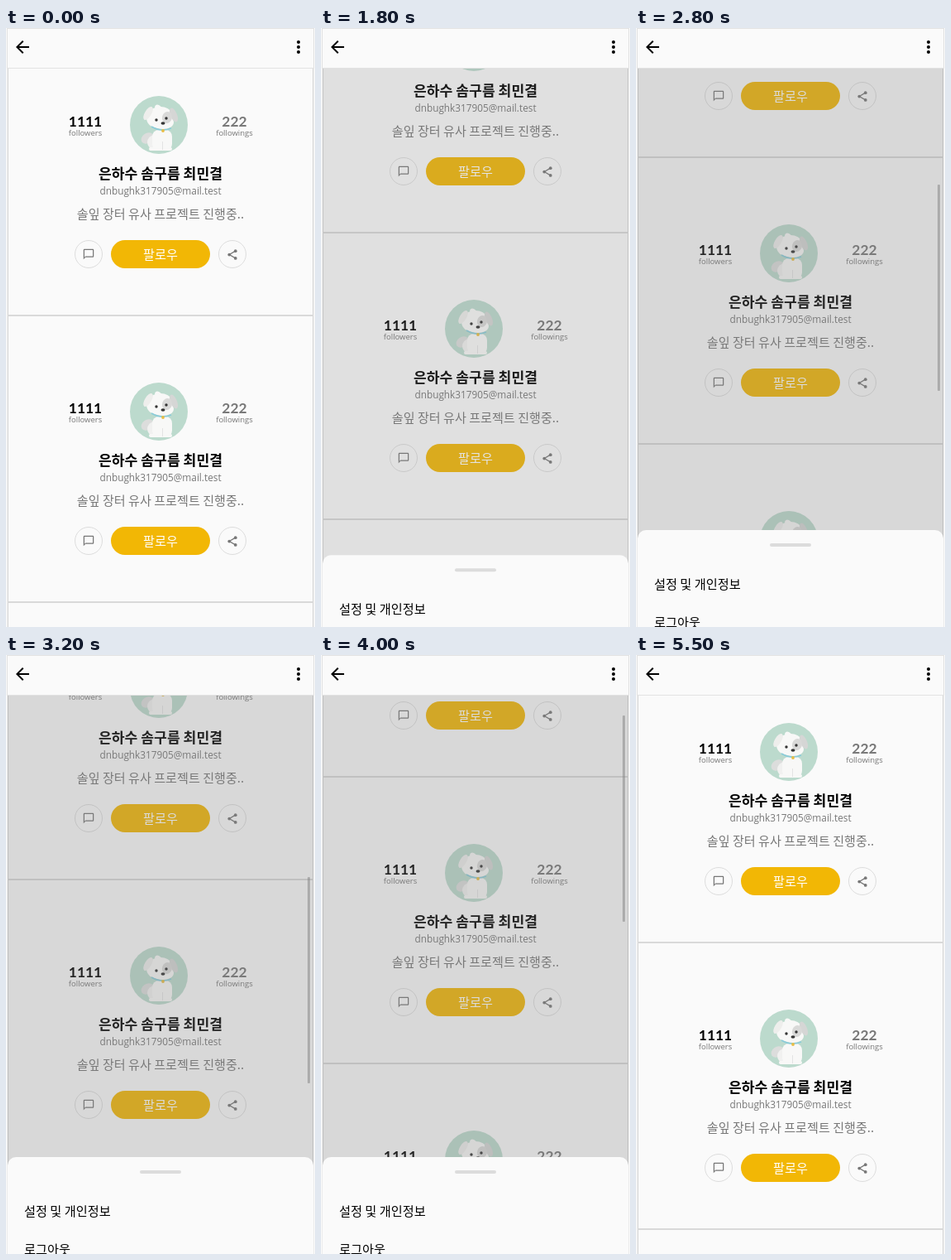
Write an HTML page with a canvas that moves like this. It is 374 px wide and 723 px high and loops after 5600 ms.

```html
<!DOCTYPE html>
<html lang="ko">
<head>
<meta charset="utf-8">
<title>프로필</title>
<style>
html, body { margin: 0; width: 100%; height: 100%; overflow: hidden; background: #fafafa; }
canvas { display: block; width: 374px; height: 723px; }
</style>
</head>
<body>
<canvas id="stage" width="374" height="723"></canvas>
<script>
const ctx = document.getElementById('stage').getContext('2d');
const LOOP = 5600, STEP = 100, BAR_HOLD = 400;
const CARD_H = 346, SHEET_H = 117;
const LATIN = '"Open Sans", sans-serif';
const DIGITS = '700 17.4px Lato, sans-serif';
const KOREAN = '"Noto Sans CJK KR", "Noto Sans CJK", sans-serif';
const GREY = '#777';

const ICONS = {
  back: new Path2D('M20 11H7.83l5.59-5.59L12 4l-8 8 8 8 1.41-1.41L7.83 13H20z'),
  chat: new Path2D('M20 2H4c-1.1 0-2 .9-2 2v18l4-4h14c1.1 0 2-.9 2-2V4c0-1.1-.9-2-2-2zm0 14H6l-2 2V4h16z')
};

// Each drag eases to its offset; power < 1 slows down, > 1 speeds up.
const DRAGS = [
  { start: 1100, end: 1300, to: 100, power: .6 },
  { start: 2300, end: 2900, to: 707, power: 1.8 },
  { start: 3100, end: 3300, to: 800, power: .6 },
  { start: 3300, end: 3700, to: 478, power: 1 },
  { start: 3800, end: 4000, to: 200, power: .6 },
  { start: 4700, end: 5000, to: 0, power: .6 }
];

const progress = (t, start, end) => Math.min(1, Math.max(0, (t - start) / (end - start)));
const smooth = p => p * p * (3 - 2 * p);

function scrollAt(t) {
  return DRAGS.reduce((y, d) => y + (d.to - y) * progress(t, d.start, d.end) ** d.power, 0);
}

function barAt(t) {
  const last = DRAGS.findLast(d => d.start < t);
  if (!last) return 0;
  return 1 - progress(t, last.end + BAR_HOLD - STEP, last.end + BAR_HOLD + STEP);
}

function sheetAt(t) {
  return smooth(progress(t, 1600, 1900)) - smooth(progress(t, 4300, 4500));
}

function text(str, x, y, font, color, align = 'center') {
  ctx.font = font;
  ctx.fillStyle = color;
  ctx.textAlign = align;
  ctx.fillText(str, x, y);
}

function rect(x, y, w, h, color) {
  ctx.fillStyle = color;
  ctx.fillRect(x, y, w, h);
}

function rounded(x, y, w, h, r, color) {
  ctx.fillStyle = color;
  ctx.beginPath();
  ctx.roundRect(x, y, w, h, r);
  ctx.fill();
}

function frame(x, y, w, h, color) {
  ctx.strokeStyle = color;
  ctx.lineWidth = 1;
  ctx.strokeRect(x + .5, y + .5, w - 1, h - 1);
}

function oval(x, y, rx, ry, color, turn = 0) {
  ctx.fillStyle = color;
  ctx.beginPath();
  ctx.ellipse(x, y, rx, ry, turn, 0, Math.PI * 2);
  ctx.fill();
}

function dot(x, y, r, color) { oval(x, y, r, r, color); }

function icon(path, x, y, size, color) {
  ctx.save();
  ctx.translate(x, y);
  ctx.scale(size / 24, size / 24);
  ctx.fillStyle = color;
  ctx.fill(path);
  ctx.restore();
}

function puppy(x, y) {
  const white = '#f8f8f7', dark = '#343434';
  ctx.save();
  ctx.translate(x, y);
  dot(0, 0, 35, '#bcdacd');
  oval(-14, 16, 8, 6, '#dcdddc', -.6);
  oval(-5, 21, 9, 9, '#f1f1f0');
  rounded(-8, 6, 24, 25, 8, white);
  rounded(-12, 27, 28, 4, 2, white);
  rect(4, 20, .8, 10, '#dedede');
  oval(1, -9, 16, 13, white, -.15);
  oval(5, -3, 13, 8, white);
  oval(-13, -14, 4, 9, '#eeeeec', .55);
  oval(18, -12, 4, 9, '#d5d6d5', -.4);
  oval(-1, -21, 4, 3, white, .5);
  oval(10, -9, 6, 7, '#d9d9d8', .3);
  dot(-3, -6, 1.7, dark);
  dot(9, -8, 1.7, dark);
  oval(5, -2, 2.5, 1.8, dark);
  ctx.strokeStyle = '#8acbd9';
  ctx.lineWidth = 1.8;
  ctx.beginPath();
  ctx.moveTo(-9, 2);
  ctx.quadraticCurveTo(3, 9, 15, 4);
  ctx.stroke();
  dot(5, 7, 1.9, '#e8bd45');
  ctx.restore();
}

function share(x, y) {
  ctx.save();
  ctx.translate(x, y);
  ctx.scale(.625, .625);
  ctx.strokeStyle = GREY;
  ctx.lineWidth = 2;
  ctx.beginPath();
  ctx.moveTo(6, -7);
  ctx.lineTo(-6, 0);
  ctx.lineTo(6, 7);
  ctx.stroke();
  dot(-6, 0, 3, GREY);
  for (const side of [-1, 1]) dot(6, 7 * side, 3, GREY);
  ctx.restore();
}

function ring(x, y) {
  ctx.strokeStyle = '#ddd';
  ctx.lineWidth = 1;
  ctx.beginPath();
  ctx.arc(x, y, 16.5, 0, Math.PI * 2);
  ctx.stroke();
}

function count(value, label, x, color) {
  text(value, x, 118, DIGITS, color);
  text(label, x, 129, '9.5px ' + LATIN, GREY);
}

function card(top) {
  ctx.save();
  ctx.translate(0, top);
  frame(2, 0, 370, CARD_H, '#d9d9d9');
  count('1111', 'followers', 96, '#000');
  count('222', 'followings', 276.5, GREY);
  puppy(185, 116);
  text('은하수 솜구름 최민결', 187, 181, '700 17.2px ' + KOREAN, '#000');
  text('dnbughk317905@mail.test', 187, 200, '11.8px ' + LATIN, GREY);
  text('솔잎 장터 유사 프로젝트 진행중..', 187, 229, '15.1px ' + KOREAN, GREY);
  ring(100, 272);
  icon(ICONS.chat, 92.5, 264.5, 15, GREY);
  rounded(127, 255, 120, 34, 17, '#f2b705');
  text('팔로우', 187, 278, '15.2px ' + KOREAN, '#fff');
  ring(274, 272);
  share(274, 272.5);
  ctx.restore();
}

function header() {
  rect(1, 0, 372, 49, '#fafafa');
  frame(1, 0, 372, 49, '#e2e2e2');
  icon(ICONS.back, 8, 11, 24, '#000');
  for (const dy of [-6, 0, 6]) dot(354, 23 + dy, 2, '#000');
}

function sheet(open) {
  ctx.save();
  ctx.translate(0, 723 - SHEET_H * open);
  rounded(2, 0, 370, 200, [10, 10, 0, 0], '#fafafa');
  rounded(162, 16, 50, 4, 2, '#dcdcdc');
  text('설정 및 개인정보', 22, 71, '15.2px ' + KOREAN, '#000', 'left');
  text('로그아웃', 22, 117, '15.2px ' + KOREAN, '#000', 'left');
  ctx.restore();
}

function draw(t) {
  const scroll = Math.round(scrollAt(t)), bar = barAt(t), open = sheetAt(t);
  rect(0, 0, 374, 723, '#fafafa');
  for (const x of [1, 372]) rect(x, 49, 1, 674, '#ececec');
  for (let i = 0; i < 6; i++) {
    const top = 1 + i * CARD_H - scroll;
    if (top < 723 && top + CARD_H > 48) card(top);
  }
  if (open) rect(2, 49, 370, 674, `rgba(125,125,125,${.28 * open})`);
  header();
  if (open) sheet(open);
  if (bar) rounded(365, Math.round(4.6 + scroll * .343), 3, 249, 1, `rgba(128,128,128,${.5 * bar})`);
}

const start = performance.now();
function tick() {
  const t = (performance.now() - start) % LOOP;
  draw(Math.floor(t / STEP) * STEP);
  requestAnimationFrame(tick);
}
tick();
</script>
</body>
</html>
```
